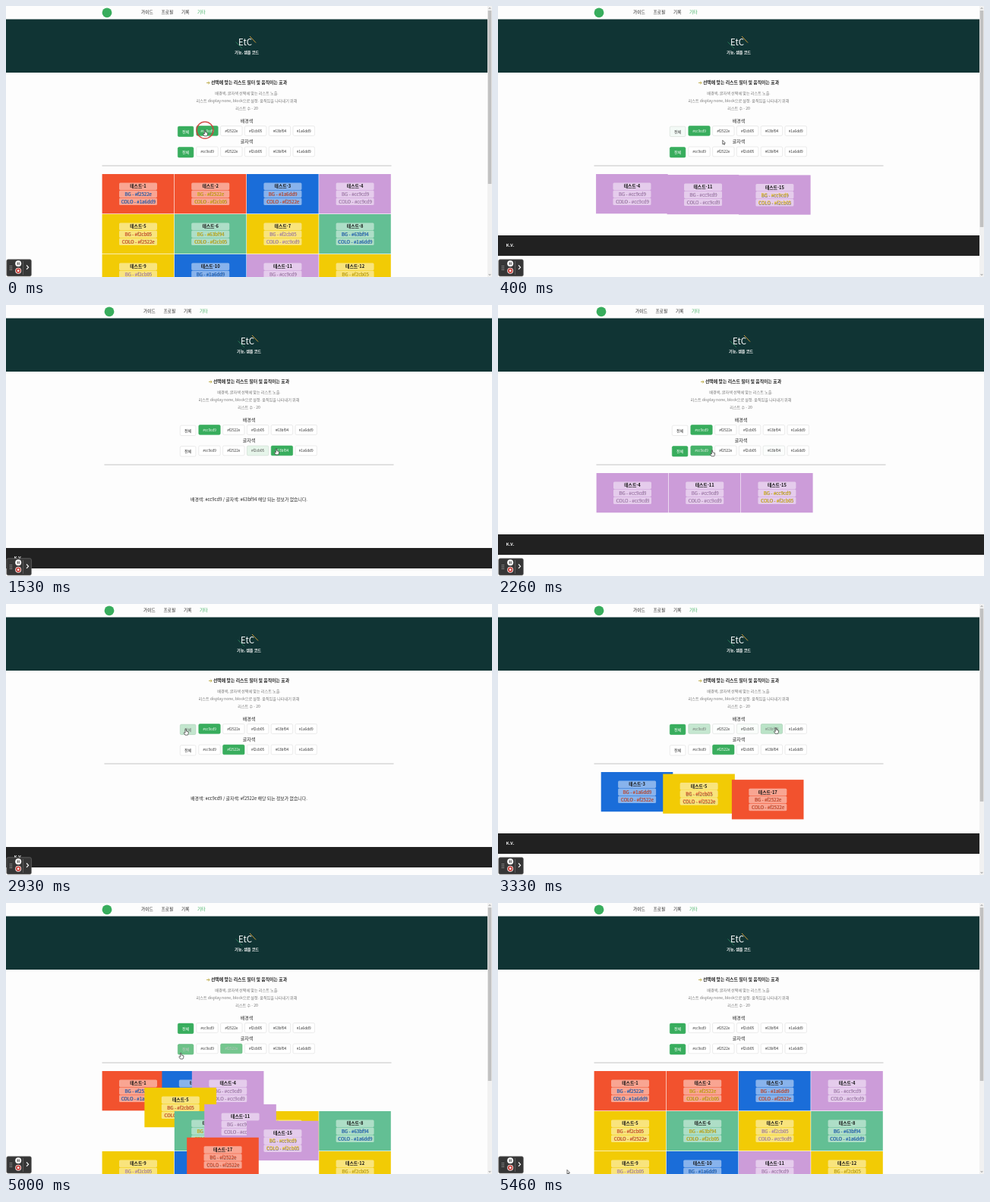
Recreate the animation shown at these times as an HTML page with a canvas. Size 640x358 px, loop 5530 ms.

```html
<!DOCTYPE html>
<html lang="ko">
<head>
<meta charset="utf-8">
<title>EtC</title>
<style>
html, body { margin: 0; width: 100%; height: 100%; overflow: hidden; background: #fff; }
canvas { display: block; width: 640px; height: 358px; }
</style>
</head>
<body>
<canvas id="stage"></canvas>
<script>
const W = 640, H = 358, LOOP = 5530;
const MOVE = 400, FADE = 500;
const FONT = '"Noto Sans CJK KR", "Noto Sans CJK", "Noto Sans", sans-serif';
const GREEN = [56, 173, 93];
const COLORS = ['cc9cd9', 'f2522e', 'f2cb05', '63bf94', '1a6dd9'];
const ROWS = [158.5, 186];
const PITCH_X = 95.2, PITCH_Y = 53, GRID_Y = 222;

const canvas = document.getElementById('stage');
const dpr = window.devicePixelRatio || 1;
canvas.width = W * dpr;
canvas.height = H * dpr;
const ctx = canvas.getContext('2d');

// Tile number, background index, text index; the rest of the 20 stay below the fold.
const tiles = [
  [1, 1, 4], [2, 1, 2], [3, 4, 1], [4, 0, 0], [5, 2, 1], [6, 3, 2], [7, 2, 0],
  [8, 3, 4], [9, 2, 0], [10, 4, 4], [11, 0, 0], [12, 2, 2], [15, 0, 2], [17, 1, 1]
].map(([n, bg, co]) => ({ n, bg, co }));

// Time, row, choice (-1 is "all").
const clicks = [
  [50, 0, 0], [772, 1, 2], [1240, 1, 3], [1850, 1, -1], [2450, 1, 1],
  [3040, 0, -1], [3480, 0, 3], [4560, 0, -1], [4900, 1, -1]
];

// Pointer tip: time, x, y.
const path = [
  [0, 262, 164], [130, 262, 164], [690, 333, 192], [790, 336, 193], [860, 341, 193],
  [1130, 361, 192], [1260, 361, 192], [1530, 356, 190], [1790, 239, 192], [1860, 240, 192],
  [1940, 259, 192], [2260, 282, 192], [2390, 299, 192], [2500, 299, 192], [2960, 236, 165],
  [3100, 236, 165], [3250, 362, 164], [3330, 366, 163.5], [3520, 366, 163.5], [3700, 364, 164],
  [4330, 238, 165], [4530, 234, 164], [4620, 234, 165], [4840, 236, 192], [4950, 236, 192],
  [5380, 91, 352.5], [LOOP, 91, 352.5]
];

const lerp = (a, b, p) => a + (b - a) * p;
const smooth = p => p * p * (3 - 2 * p);

// cubic-bezier(.25, .1, .25, 1)
function ease(p) {
  if (p <= 0) return 0;
  if (p >= 1) return 1;
  const curve = (u, a, b) => 3 * u * (1 - u) ** 2 * a + 3 * u * u * (1 - u) * b + u ** 3;
  let lo = 0, hi = 1;
  for (let i = 0; i < 20; i++) {
    const mid = (lo + hi) / 2;
    if (curve(mid, .25, .25) < p) lo = mid; else hi = mid;
  }
  return curve(lo, .1, 1);
}

const lastBefore = (list, t) => list.filter(e => e.t <= t).pop();
const slotPos = i => ({ x: (i % 4) * PITCH_X, y: Math.floor(i / 4) * PITCH_Y });

function between(from, to, p) {
  return { x: lerp(from.x, to.x, p), y: lerp(from.y, to.y, p) };
}

function buildSteps() {
  const kept = new Map(tiles.map(tile => [tile, slotPos(tile.n - 1)]));
  const pick = [-1, -1];
  const makeStep = t => {
    const [bg, co] = pick;
    const all = bg < 0 && co < 0;
    const shown = tiles.filter(k => (bg < 0 || k.bg === bg) && (co < 0 || k.co === co));
    const moves = shown.map((tile, i) => {
      const from = kept.get(tile), to = slotPos(all ? tile.n - 1 : i);
      kept.set(tile, to);
      return { tile, from, to };
    });
    const reach = Math.max(0, ...moves.map(m => GRID_Y + m.from.y + 52));
    return { t, bg, co, all, moves, reach };
  };
  const list = [makeStep(-MOVE)];
  for (const [t, row, choice] of clicks) {
    pick[row] = choice;
    list.push(makeStep(t));
  }
  return list;
}
const steps = buildSteps();

function docHeight(step, t) {
  if (step.all) return 541;
  return t - step.t < MOVE && step.reach > H ? step.reach : H;
}
const centerAt = (step, t) => docHeight(step, t) > H ? 317 : 320;

function pointerAt(t) {
  const i = Math.max(1, path.findIndex(k => k[0] > t));
  const a = path[i - 1], b = path[i];
  const p = smooth((t - a[0]) / (b[0] - a[0]));
  return { x: lerp(a[1], b[1], p), y: lerp(a[2], b[2], p) };
}

const buttons = [];
for (const row of [0, 1]) {
  for (let choice = -1; choice < 5; choice++) {
    buttons.push({
      row, choice,
      dx: choice < 0 ? -90.7 : -66.2 + 31.8 * choice,
      y: ROWS[row] + (choice < 0 ? .6 : 0),
      w: choice < 0 ? 20.6 : 28.4,
      h: choice < 0 ? 13.4 : 12.8,
      label: choice < 0 ? '전체' : '#' + COLORS[choice],
      flips: []
    });
  }
}

function isOver(b, m, cx) {
  const x = cx + b.dx;
  return m.x >= x && m.x <= x + b.w && m.y >= b.y && m.y <= b.y + b.h;
}

function levelAt(b, t) {
  const f = lastBefore(b.flips, t);
  return lerp(f.from, f.to, ease((t - f.t) / FADE));
}

// Record each change of selection or hover so the fades depend on time alone.
for (let t = 0; t < LOOP; t += 10) {
  const step = lastBefore(steps, t), m = pointerAt(t), cx = centerAt(step, t);
  for (const b of buttons) {
    const picked = (b.row ? step.co : step.bg) === b.choice;
    const to = picked || isOver(b, m, cx) ? 1 : 0;
    const last = b.flips[b.flips.length - 1];
    if (!last) b.flips.push({ t, from: to, to });
    else if (last.to !== to) b.flips.push({ t, from: levelAt(b, t), to });
  }
}

function text(str, x, y, size, color, weight = 400, align = 'center') {
  ctx.font = `${weight} ${size}px ${FONT}`;
  ctx.textAlign = align;
  ctx.textBaseline = 'middle';
  ctx.fillStyle = color;
  ctx.fillText(str, x, y);
}

function rect(x, y, w, h, color) {
  ctx.fillStyle = color;
  ctx.fillRect(x, y, w, h);
}

function roundRect(x, y, w, h, r, fill, stroke) {
  ctx.beginPath();
  ctx.roundRect(x, y, w, h, r);
  ctx.fillStyle = fill;
  ctx.fill();
  if (stroke) {
    ctx.strokeStyle = stroke;
    ctx.lineWidth = .6;
    ctx.stroke();
  }
}

function disc(x, y, r, color) {
  ctx.beginPath();
  ctx.arc(x, y, r, 0, Math.PI * 2);
  ctx.fillStyle = color;
  ctx.fill();
}

function line(points, color, width) {
  ctx.beginPath();
  points.forEach(([x, y], i) => i ? ctx.lineTo(x, y) : ctx.moveTo(x, y));
  ctx.strokeStyle = color;
  ctx.lineWidth = width;
  ctx.stroke();
}

function polygon(points, fill, stroke) {
  ctx.beginPath();
  points.forEach(([x, y]) => ctx.lineTo(x, y));
  ctx.closePath();
  ctx.fillStyle = fill;
  ctx.fill();
  ctx.strokeStyle = stroke;
  ctx.lineWidth = .7;
  ctx.stroke();
}

const mix = (a, b, p) => `rgb(${a.map((v, i) => Math.round(lerp(v, b[i], p)))})`;

function drawHeader(cx, width) {
  disc(cx - 184, 8.8, 6.4, mix(GREEN, GREEN, 0));
  [['가이드', -139], ['프로필', -112.5], ['기록', -86], ['기타', -65]].forEach(([s, dx], i) =>
    text(s, cx + dx, 8, 5.7, i === 3 ? '#38ad5d' : '#222', 400, 'left'));

  rect(0, 17.5, width, 70.5, '#103434');
  line([[cx + 4, 40], [cx + 12, 48.5]], '#e0a53a', .9);
  line([[cx - 14.5, 47.5], [cx - 6, 56]], '#2b8a5c', .8);
  text('EtC', cx - 2, 48, 11.4, '#fff', 500);
  text('기능, 샘플 코드', cx, 61, 5.1, '#fff', 700);
}

function drawIntro(cx) {
  const y = 101.5, x = cx - 53;
  line([[x, y], [x + 4, y]], '#b7a53c', .9);
  line([[x + 2.4, y - 1.7], [x + 4.2, y], [x + 2.4, y + 1.7]], '#b7a53c', .9);
  text('선택에 맞는 리스트 필터 및 움직이는 효과', cx + 3, 101, 5.9, '#222', 700);
  text('배경색, 글자색 선택에 맞는 리스트 노출.', cx, 115, 5.1, '#777');
  text('리스트 display none, block으로 설정. 움직임을 나타내기 위해', cx, 125, 5.1, '#777');
  text('리스트 수 - 20', cx, 135, 5.1, '#777');
  text('배경색', cx, 151.5, 5.9, '#222');
  text('글자색', cx, 179, 5.9, '#222');
  rect(cx - 190.5, 210.5, 381, 1, '#c4c4c4');
}

function drawButton(b, cx, t) {
  const p = levelAt(b, t), x = cx + b.dx;
  roundRect(x, b.y, b.w, b.h, 1.6, mix([255, 255, 255], GREEN, p), mix([222, 222, 222], GREEN, p));
  text(b.label, x + b.w / 2, b.y + b.h / 2 + .2, b.choice < 0 ? 5.1 : 4.7,
    mix([45, 45, 45], [255, 255, 255], p), p > .5 ? 500 : 400);
}

function drawTile({ tile, from, to }, left, p) {
  const pos = between(from, to, p);
  const x = left + pos.x, y = GRID_Y + pos.y, mid = x + PITCH_X / 2 - .2;
  if (y > H) return;
  const bg = '#' + COLORS[tile.bg], co = '#' + COLORS[tile.co];
  rect(x, y, PITCH_X - .6, 52.3, bg);
  for (let i = 0; i < 3; i++) {
    roundRect(mid - 25, y + 11.5 + i * 10, 50, 9.6, 1.6, 'rgba(255,255,255,.48)');
  }
  text('테스트-' + tile.n, mid, y + 16.2, 5.8, '#111', 700);
  ['BG - ' + bg, 'COLO - ' + co].forEach((s, i) => {
    const ty = y + 26.3 + i * 10;
    text(s, mid + .5, ty + .5, 6.1, 'rgba(0,0,0,.55)', 500);
    text(s, mid, ty, 6.1, co, 500);
  });
}

function drawScrollbar(height) {
  rect(634, 0, 6, H, '#f1f1f1');
  rect(634.7, 6, 4.6, (H - 12) * H / height, '#c1c1c1');
  line([[635.8, 3.8], [637, 2.4], [638.2, 3.8]], '#777', .8);
  line([[635.8, H - 3.8], [637, H - 2.4], [638.2, H - 3.8]], '#777', .8);
}

function drawRecorder() {
  roundRect(.8, 334.8, 32.6, 22.2, 2, '#363636', '#777');
  for (let i = 0; i < 6; i++) disc(5.5 + (i % 2) * 2, 343.5 + (i >> 1) * 2.4, .6, '#bbb');
  disc(16.2, 340.2, 4, '#fff');
  rect(14.7, 338.5, 1, 3.4, '#333');
  rect(16.7, 338.5, 1, 3.4, '#333');
  disc(16.2, 349.7, 4, '#f3e4e2');
  disc(16.2, 349.7, 3.1, '#c8413b');
  rect(15, 348.5, 2.4, 2.4, '#fff');
  rect(22.2, 337, .6, 18, '#777');
  line([[27, 342.5], [29.6, 345.2], [27, 347.9]], '#fff', 1.1);
}

function drawPointer(t, cx) {
  const m = pointerAt(t);
  if (clicks.some(([c]) => t > c - 100 && t < c + 40)) {
    ctx.beginPath();
    ctx.arc(m.x, m.y, 11, 0, Math.PI * 2);
    ctx.strokeStyle = 'rgba(205,62,58,.9)';
    ctx.lineWidth = 1.5;
    ctx.stroke();
  }
  const hand = [[-.7, 0], [.5, 0], [.7, 2.7], [3.6, 3.6], [3.4, 6], [2.6, 7.8], [-.8, 7.8],
    [-2.6, 5], [-2, 4.3], [-.7, 5]];
  const arrow = [[0, 0], [0, 5.4], [1.2, 4.3], [2, 6], [2.8, 5.6], [2.1, 4], [3.6, 3.8]];
  const shape = buttons.some(b => isOver(b, m, cx)) ? hand : arrow;
  polygon(shape.map(([x, y]) => [m.x + x, m.y + y]), '#fff', '#333');
}

function draw(t) {
  const step = lastBefore(steps, t);
  const height = docHeight(step, t), cx = centerAt(step, t);
  const width = height > H ? 634 : W;
  const p = ease((t - step.t) / MOVE);

  ctx.setTransform(dpr, 0, 0, dpr, 0, 0);
  rect(0, 0, W, H, '#fdfdfd');
  drawHeader(cx, width);
  drawIntro(cx);
  buttons.forEach(b => drawButton(b, cx, t));

  const empty = !step.moves.length;
  if (!step.all) {
    const y = empty ? 321 : 303;
    rect(0, y, width, 27, '#212121');
    text('K.V.', 10.8, y + 13.3, 5.4, '#fff', 700, 'left');
  }
  if (empty) {
    text(`배경색: #${COLORS[step.bg]} / 글자색: #${COLORS[step.co]} 해당 되는 정보가 없습니다.`,
      cx, 257, 5.9, '#222');
  }
  step.moves.forEach(m => drawTile(m, cx - 190.4, p));
  if (height > H) drawScrollbar(height);
  drawRecorder();
  drawPointer(t, cx);
}

const start = performance.now();
function tick() {
  draw((performance.now() - start) % LOOP);
  requestAnimationFrame(tick);
}
tick();
</script>
</body>
</html>
```
